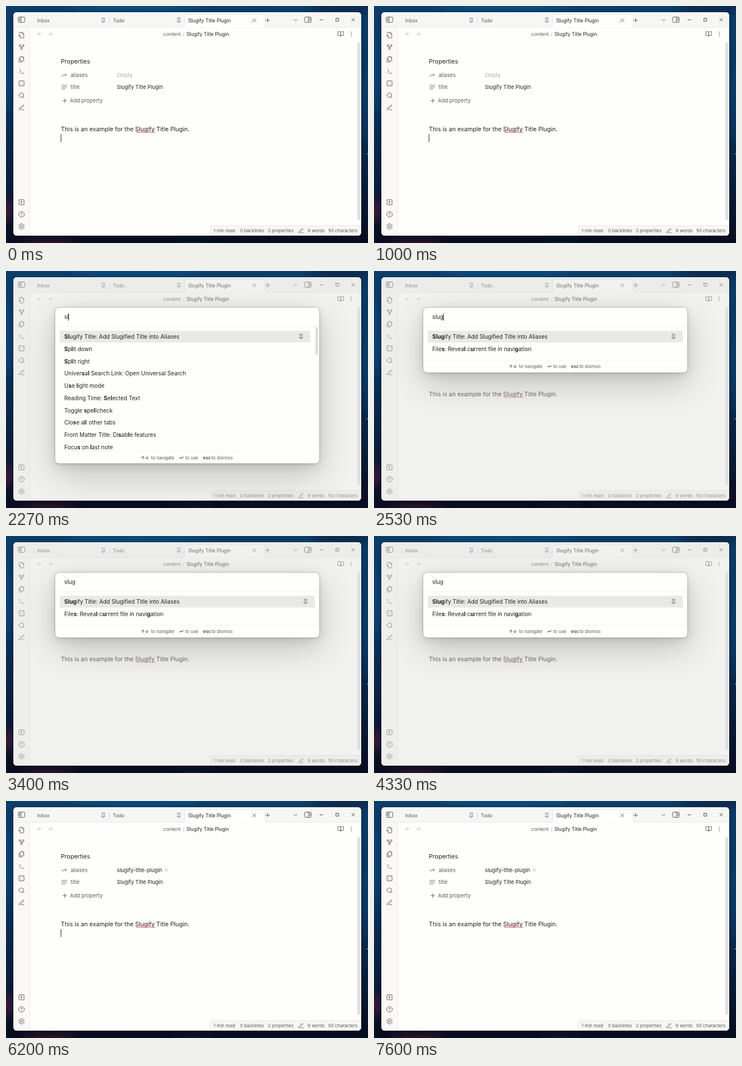
An HTML page for the animation above (7.94 s loop, 640x420 px).

```html
<!DOCTYPE html>
<html lang="en">
<head>
<meta charset="utf-8">
<title>Command palette demo</title>
<style>
html, body { margin: 0; width: 100%; height: 100%; overflow: hidden; background: #0a1730; }
#stage { position: absolute; left: 0; top: 0; width: 640px; height: 420px; overflow: hidden; }
svg { position: absolute; left: 0; top: 0; display: block; }
text { font-family: Inter, "Liberation Sans", sans-serif; white-space: pre; }
.b { font-weight: 700; }
#dim { position: absolute; left: 13px; top: 11px; width: 615px; height: 396px; overflow: hidden;
  border-radius: 6px; background: rgba(220, 220, 220, .4); }
#modal { position: absolute; left: 74px; top: 54px; width: 467px; border-radius: 7px; background: #fefefd;
  box-shadow: 0 0 0 .7px rgba(0, 0, 0, .2), 0 1.2px 4.8px rgba(0, 0, 0, .07),
    0 4.2px 16.3px rgba(0, 0, 0, .11), 0 20px 60px rgba(0, 0, 0, .2); }
</style>
</head>
<body>
<div id="stage">
  <svg id="base" width="640" height="420" viewBox="0 0 640 420"></svg>
  <div id="dim"><div id="modal"></div></div>
  <svg id="palette" width="640" height="420" viewBox="0 0 640 420"></svg>
</div>
<script>
const LOOP = 7940;
const INK = '#222', MUTED = '#5c5c5c', FAINT = '#ababab', LINE = '#e0e0de', PAPER = '#fefefc';
const UI = 9.26, SMALL = 8.6, TINY = 7.93, BODY = 10.58, ROW = 9.92;
const PITCH = 21.75;
const $ = id => document.getElementById(id);

const circle = (x, y, r) => `M${x - r} ${y}a${r} ${r} 0 1 0 ${2 * r} 0a${r} ${r} 0 1 0 ${-2 * r} 0`;
const box = (x, y, w, h, r = 2) =>
  `M${x + r} ${y}h${w - 2 * r}a${r} ${r} 0 0 1 ${r} ${r}v${h - 2 * r}a${r} ${r} 0 0 1 ${-r} ${r}` +
  `h${2 * r - w}a${r} ${r} 0 0 1 ${-r} ${-r}v${2 * r - h}a${r} ${r} 0 0 1 ${r} ${-r}`;

function gear() {
  const pts = [];
  for (let i = 0; i < 72; i++) {
    const a = i * Math.PI / 36;
    const r = 8.7 + 1.7 * Math.tanh(2 * Math.cos(6 * a));
    pts.push((12 + r * Math.sin(a)).toFixed(2) + ' ' + (12 - r * Math.cos(a)).toFixed(2));
  }
  return 'M' + pts.join('L') + 'Z' + circle(12, 12, 3);
}

// Icon outlines on a 24-unit grid
const ICONS = {
  fileSearch: 'M14 2v4a2 2 0 0 0 2 2h4M4.3 7V4a2 2 0 0 1 2-2H15l5 5v13a2 2 0 0 1-2 2H6M9 18l-1.5-1.5' + circle(5, 14, 3),
  fork: circle(12, 18, 3) + circle(6, 6, 3) + circle(18, 6, 3) + 'M18 9v1a2 2 0 0 1-2 2H8a2 2 0 0 1-2-2V9M12 12v3',
  files: 'M20 7h-3a2 2 0 0 1-2-2V2M9 18a2 2 0 0 1-2-2V4a2 2 0 0 1 2-2h7l4 4v10a2 2 0 0 1-2 2zM3 7.6v12.8a1.6 1.6 0 0 0 1.6 1.6h9.8',
  terminal: 'M4 17l6-6-6-6M12 19h8',
  dice: box(3, 3, 18, 18) + 'M16 8h.01M12 12h.01M8 16h.01M8 8h.01M16 16h.01',
  search: circle(11, 11, 8) + 'M21 21l-4.3-4.3',
  pen: 'M12 20h9M16.5 3.5a2.12 2.12 0 0 1 3 3L7 19l-4 1 1-4Z',
  vault: box(3, 3, 18, 18) + circle(12, 10, 2.2) + 'M12 12.5v4',
  help: circle(12, 12, 10) + 'M9.09 9a3 3 0 0 1 5.83 1c0 2-3 3-3 3M12 17h.01',
  gear: gear(),
  pin: 'M12 17v5M9 10.76a2 2 0 0 1-1.11 1.79l-1.78.9A2 2 0 0 0 5 15.24V16a1 1 0 0 0 1 1h12a1 1 0 0 0 1-1v-.76' +
    'a2 2 0 0 0-1.11-1.79l-1.78-.9A2 2 0 0 1 15 10.76V7a1 1 0 0 1 1-1 2 2 0 0 0 0-4H8a2 2 0 0 0 0 4 1 1 0 0 1 1 1z',
  sideLeft: box(1, 3, 22, 18, 3) + 'M10 3v18M4 7.5h3M4 11h3M4 14.5h3',
  sideRight: box(1, 3, 22, 18, 3) + 'M14 3v18M17 7.5h3M17 11h3M17 14.5h3',
  x: 'M18 6L6 18M6 6l12 12',
  plus: 'M5 12h14M12 5v14',
  minus: 'M6 12h12',
  square: box(6, 6, 12, 12, .5),
  chevron: 'M6 9l6 6 6-6',
  left: 'M12 19l-7-7 7-7M19 12H5',
  right: 'M5 12h14M12 5l7 7-7 7',
  book: 'M2 3h6a4 4 0 0 1 4 4v14a3 3 0 0 0-3-3H2zM22 3h-6a4 4 0 0 0-4 4v14a3 3 0 0 1 3-3h7z',
  dots: circle(12, 5, 1) + circle(12, 12, 1) + circle(12, 19, 1),
  forward: 'M15 17l5-5-5-5M4 18v-2a4 4 0 0 1 4-4h12',
  lines: 'M2 5h20M2 12h20M2 19h14'
};

const icon = (name, cx, cy, size = 10.6, color = MUTED, weight = 1.9) =>
  `<path d="${ICONS[name]}" transform="translate(${cx - size / 2} ${cy - size / 2}) scale(${size / 24})"
    fill="none" stroke="${color}" stroke-width="${weight}" stroke-linecap="round" stroke-linejoin="round"/>`;

// cy is the middle of the capitals; *...* marks bold runs
const text = (s, x, cy, size, color = INK, extra = '') =>
  `<text x="${x}" y="${(cy + size * .364).toFixed(2)}" font-size="${size}" fill="${color}" ${extra}>` +
  s.split('*').map((p, i) => i % 2 ? `<tspan class="b">${p}</tspan>` : p).join('') + '</text>';

const rect = (x, y, w, h, fill, extra = '') =>
  `<rect x="${x}" y="${y}" width="${w}" height="${h}" fill="${fill}" ${extra}/>`;

const glow = (x, y, rx, ry, color, opacity) =>
  `<ellipse cx="${x}" cy="${y}" rx="${rx}" ry="${ry}" fill="${color}" opacity="${opacity}" filter="url(#soft)"/>`;

function wallpaper() {
  return `<defs>
    <linearGradient id="sky" x2="0" y2="1"><stop offset="0" stop-color="#0b3e69"/><stop offset=".35" stop-color="#0a3560"/>
      <stop offset=".7" stop-color="#0a2140"/><stop offset="1" stop-color="#080d1f"/></linearGradient>
    <filter id="soft" x="-100%" y="-100%" width="300%" height="300%"><feGaussianBlur stdDeviation="7"/></filter>
    <filter id="drop" x="-10%" y="-10%" width="120%" height="120%"><feGaussianBlur stdDeviation="3"/></filter>
    <clipPath id="win"><rect x="13" y="11" width="615" height="396" rx="6"/></clipPath>
  </defs>` + rect(0, 0, 640, 420, 'url(#sky)') +
    glow(230, 0, 120, 12, '#0d5288', .6) + glow(600, 0, 60, 14, '#0a2442', .7) +
    glow(0, 120, 12, 70, '#0c4a80', .5) + glow(640, 180, 10, 70, '#0d4a7c', .4) +
    glow(4, 362, 8, 22, '#5a1c3c', .7) + glow(75, 419, 50, 6, '#571a34', .6) +
    glow(330, 419, 40, 5, '#101a36', .8) + rect(638.5, 261, 1.5, 1.5, '#a9c4dc') +
    rect(13, 12, 615, 397, '#000', 'rx="6" opacity=".35" filter="url(#drop)"');
}

function appWindow() {
  const ribbon = ['fileSearch', 'fork', 'files', 'terminal', 'dice', 'search', 'pen'];
  const PIN = '#4f739f';
  let s = '<g clip-path="url(#win)">' + rect(13, 11, 615, 396, PAPER) +
    rect(13, 11, 615, 27, '#f6f6f4') + rect(13, 38, 29, 369, '#faf9f7') +
    rect(13, 37.6, 615, .7, LINE) + rect(41.6, 38, .7, 369, LINE) +
    `<path d="M312 38.3q4 0 4-4V19q0-4 4-4h134q4 0 4 4v15.3q0 4 4 4z" fill="${PAPER}"/>
     <path d="M312 38q4 0 4-4V19q0-4 4-4h134q4 0 4 4v15q0 4 4 4" fill="none" stroke="${LINE}" stroke-width=".7"/>` +
    rect(182.7, 19, .7, 13, '#cfcfcd');

  s += icon('sideLeft', 27.5, 24.3, 12.5) +
    text('Inbox', 55, 25.7, SMALL, MUTED) + icon('pin', 172, 25.5, 10.6, PIN) +
    text('Todo', 189, 25.7, SMALL, MUTED) + icon('pin', 305.5, 25.5, 10.6, PIN) +
    text('Slugify Title Plugin', 322, 25.7, SMALL) + icon('x', 439, 25.5, 12) +
    icon('plus', 462.5, 25.2, 12) + icon('chevron', 512, 25, 12) + icon('sideRight', 533.7, 24.3, 12.5) +
    icon('minus', 557.6, 24.5, 10, INK) + icon('square', 585.7, 24.3, 10, INK) + icon('x', 613.7, 24.3, 10, INK);

  s += icon('left', 59.3, 49.5, 11, '#bdbdbb') + icon('right', 78.3, 49.5, 11, '#bdbdbb') +
    text('content', 278, 49.9, SMALL, MUTED) + text('/', 312.5, 49.9, SMALL, FAINT) +
    text('Slugify Title Plugin', 319, 49.9, SMALL) +
    icon('book', 591.7, 49.5, 11) + icon('dots', 610.6, 49.5, 11);

  ribbon.forEach((name, i) => s += icon(name, 27.5, 51.5 + i * 21.4, 11.9));
  ['vault', 'help', 'gear'].forEach((name, i) => s += icon(name, 27.5, 347.8 + i * 21.4, 11.9));

  s += text('Properties', 97, 98, BODY) +
    `<rect id="hover" x="94.2" y="112.2" width="468.6" height="19.6" rx="3" fill="none" stroke="#dededc" stroke-width=".7"/>` +
    icon('forward', 103, 122.2) + text('aliases', 114.3, 122.6, UI, MUTED) +
    text('Empty', 196, 122.6, UI, FAINT, 'id="empty"') +
    '<g id="alias">' + text('slugify-title-plugin', 196, 122.6, UI) + icon('x', 283.5, 122.4, 8.6, '#8c8c8a') + '</g>' +
    icon('lines', 103, 143.7) + text('title', 114.3, 144, UI, MUTED) + text('Slugify Title Plugin', 196, 144, UI) +
    icon('plus', 104, 167.8, 12) + text('Add property', 113, 168, UI, MUTED) +
    text('This is an example for the Slugify Title Plugin.', 97, 218.3, BODY);

  let wave = 'M230 223.6';
  for (let x = 230; x < 264; x += 2) wave += `q.5 -1.3 1 0t1 0`;
  s += `<path d="${wave}" fill="none" stroke="#e0303c" stroke-width=".9"/>` +
    rect(96.7, 227, 1, 14, INK, 'id="caret"') +
    rect(621, 64, 5, 315, '#e1e1df', 'rx="1.5"');

  s += `<path d="M361 407v-14q0-4 4-4h263v18z" fill="#f6f6f4" stroke="${LINE}" stroke-width=".7"/>`;
  [['1 min read', 367], ['0 backlinks', 413.7], ['2 properties', 463], ['9 words', 533.3], ['50 characters', 569.8]]
    .forEach(([label, x]) => s += text(label, x, 398.5, TINY, MUTED));
  return s + icon('pen', 521.5, 398.3, 10.6) + '</g>';
}

const FIRST = 'lugify Title: Add Slugified Title into Aliases';
// rows: label, then pin flag and shortcut [text, pill x, pill width]
const LISTS = {
  '': { thumb: 27, rows: [
    ['S' + FIRST, 1], ['Quick switcher: Open quick switcher', 1, ['Ctrl + O', 471, 38]],
    ['Open Local Archive: Open Local Archive Link', 1], ['Add cursor above'], ['Add cursor below'],
    ['Add embed'], ['Add file property', 0, ['Ctrl + ;', 496.5, 33]], ['Add internal link'], ['Add tag'],
    ['Backlinks: Open backlinks for the current note']] },
  's': { thumb: 30, rows: [
    ['*S*' + FIRST, 1], ['*S*ave current file'], ['*S*how debug info'], ['*S*plit down'], ['*S*plit right'],
    ['*S*earch: Search in all files'], ['Open *s*ettings'], ['U*s*e light mode'],
    ['Toggle *s*pellcheck'], ['Clo*s*e all other tabs']] },
  'sl': { thumb: 49, rows: [
    ['*Sl*ugify Title: Add Slugified Title into Aliases', 1], ['*S*p*l*it down'], ['*S*p*l*it right'],
    ['Univer*s*a*l* Search Link: Open Universal Search'], ['U*s*e *l*ight mode'],
    ['Reading Time: *S*e*l*ected Text'], ['Toggle *s*pe*l*lcheck'], ['Clo*s*e a*l*l other tabs'],
    ['Front Matter Title: Di*s*ab*l*e features'], ['Focu*s* on *l*ast note']] },
  'slu': { rows: [
    ['*Slu*gify Title: Add Slugified Title into Aliases', 1],
    ['Univer*s*a*l* Search Link: Open *U*niversal Search'],
    ['Front Matter Title: Di*s*ab*l*e feat*u*res'],
    ['File*s*: Revea*l* c*u*rrent file in navigation']] },
  'slug': { rows: [
    ['*Slug*ify Title: Add Slugified Title into Aliases', 1],
    ['File*s*: Revea*l* c*u*rrent file in navi*g*ation']] }
};

const modalHeight = query => Math.min(276, 71.3 + PITCH * LISTS[query].rows.length);

function paletteMarkup(query) {
  const { rows, thumb } = LISTS[query];
  const bottom = 65 + modalHeight(query), end = bottom - 22;
  const right = thumb ? 538 : 546;
  let s = text(query || 'Select a command...', 103, 81.8, ROW, query ? INK : '#b3b3b1', 'id="query"') +
    rect(102.6, 75, 1, 13, INK, 'id="typeCaret"') +
    rect(87, 98, 467, .6, '#ececea') + rect(87, end, 467, .6, '#ececea') +
    rect(95, 105.8, right - 95, 21, '#e9e9e7', 'rx="2.6"');
  rows.forEach(([label, pinned, key], i) => {
    const y = 116.4 + i * PITCH;
    s += text(label, 103, y, ROW);
    if (pinned) s += icon('pin', right - 16.5, y, 10.6);
    if (key) s += rect(key[1], y - 6.6, key[2], 13.2, '#f3f3f1', 'rx="2.6"') + text(key[0], key[1] + 4, y, TINY, MUTED);
  });
  if (thumb) s += rect(547, 99.5, 5, thumb, '#dededc', 'rx="1.5"');
  const y = bottom - 10.3;
  return s + text('*↑↓*', 238.5, y, TINY, MUTED) + text('to navigate', 256.4, y, TINY, MUTED) +
    text('*↵*', 306, y, TINY, MUTED) + text('to use', 317, y, TINY, MUTED) +
    text('*esc*', 348.3, y, TINY, MUTED) + text('to dismiss', 363.3, y, TINY, MUTED);
}

$('base').innerHTML = wallpaper() + appWindow();

const OPEN = 1530, CLOSE = 4600, FILLED = 4670, UNHOVER = 6200;
const KEYS = [[2130, 's'], [2270, 'sl'], [2400, 'slu'], [2530, 'slug']];
const show = (id, on) => $(id).style.display = on ? '' : 'none';
const within = (t, spans) => spans.some(([a, b]) => t >= a && t < b);
let shown = null;

function setQuery(query) {
  if (query === shown) return;
  shown = query;
  $('modal').style.height = modalHeight(query) + 'px';
  $('palette').innerHTML = paletteMarkup(query);
  const x = query ? 102.6 + $('query').getComputedTextLength() : 102.6;
  $('typeCaret').setAttribute('x', x);
}

function render(t) {
  const open = t >= OPEN && t < CLOSE;
  show('dim', open);
  show('palette', open);
  if (open) {
    setQuery(KEYS.reduce((q, [at, s]) => t >= at ? s : q, ''));
    show('typeCaret', !within(t, [[2070, 2130], [3400, 3800], [4330, CLOSE]]));
  }
  const blink = t < OPEN ? t < 400 || t >= 1000 : Math.floor((t - CLOSE) / 600) % 2 === 0;
  show('caret', !open && blink);
  show('hover', t >= CLOSE && t < UNHOVER);
  show('empty', t < FILLED);
  show('alias', t >= FILLED);
}

const start = performance.now();
function tick() {
  render((performance.now() - start) % LOOP);
  requestAnimationFrame(tick);
}
tick();
</script>
</body>
</html>
```
